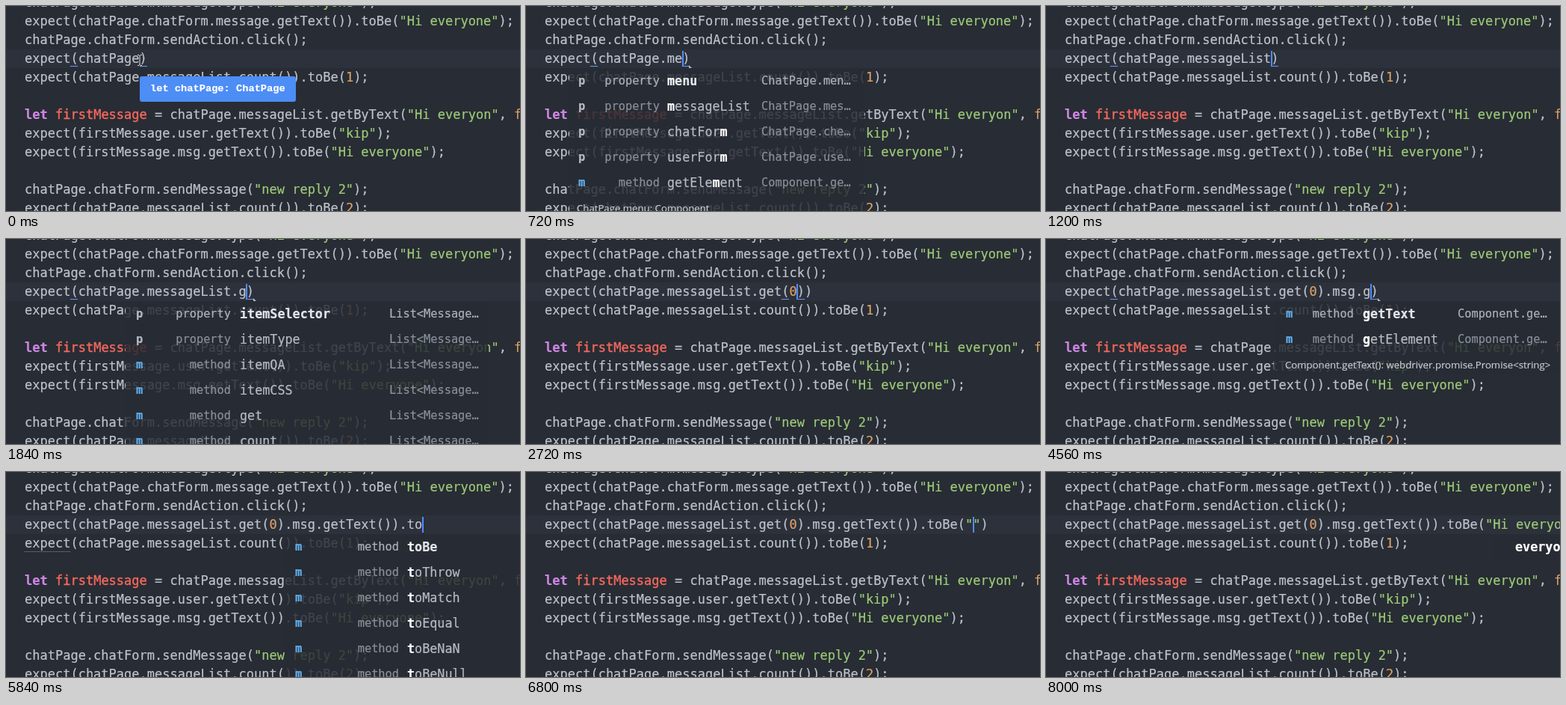
Animation of 688x274 px, one loop 8.16 s. Source, as an HTML page:

```html
<!DOCTYPE html>
<html lang="en">
<head>
<meta charset="utf-8">
<title>Editor autocompletion</title>
<style>
html, body { margin: 0; width: 100%; height: 100%; overflow: hidden; background: #282c34; }
#stage { position: relative; width: 688px; height: 274px; overflow: hidden; background: #282c34;
  color: #bdc2cc; font: 17px/25px "DejaVu Sans Mono", monospace; -webkit-text-stroke: .2px; }
#stage div, #stage i { position: absolute; white-space: pre; font-style: normal; }
.line { left: 25px; height: 25px; }
.row { left: 0; right: 0; height: 34px; line-height: 34px; font-size: 16.75px; color: #b6bbc4; }
.row.on { color: #e2e5ea; }
.row.on .name { font-weight: bold; }
.row b { color: #fff; }
.row .kind, .row .type { font-size: 15.3px; color: #8a909b; }
.row.on .kind, .row.on .type { color: #adb2bc; }
.row .icon { font-size: 15.5px; font-weight: bold; color: #b4b9c2; }
.row .icon.m { color: #61afef; }
.popup { top: 83px; overflow: hidden; background: rgba(40, 44, 52, .84); }
.note { line-height: 26px; font-family: "Open Sans", sans-serif; font-size: 13.2px; color: #c6cad2; }
.str { color: #9ccb78; }
.num { color: #dba067; }
.let { color: #cf86e6; font-weight: bold; }
.var { color: #f4685e; -webkit-text-stroke: .4px; }
.active { left: 0; top: 58px; width: 688px; height: 25px; background: #2c313b; }
.caret { top: 60px; width: 2px; height: 21px; background: #528bff; }
.pair { top: 80px; width: 10px; height: 1px; background: #6497f5; }
.lint { left: 25px; top: 106px; width: 61px; border-top: 1px dotted #8b919b; }
.tip { left: 179px; top: 94px; width: 195px; height: 34px; padding-left: 14px; border-radius: 3px;
  background: #4d8df6; color: #fff; font: bold 13.7px/33px "Liberation Mono", monospace; }
.error { left: 424px; top: 87px; width: 232px; height: 30px; border-radius: 4px;
  background: #b4b8bf; }
.error i { top: 6px; height: 18px; line-height: 18px; border-radius: 3px; text-align: center;
  color: #fff; font-size: 11.5px; font-weight: bold; }
.error .label { top: 0; height: 30px; line-height: 30px; color: #25282e; font-size: 11.9px; font-weight: normal; }
.tail { border: solid transparent; border-bottom-color: #b4b8bf; border-left: 0; border-top: 0; }
.beam { left: 176px; top: 65px; width: 6px; height: 15px; }
.beam svg { display: block; }
</style>
</head>
<body>
<div id="stage"></div>
<script>
const CHAR = 10.234, LEFT = 25, LOOP = 8160;
const stage = document.getElementById("stage");

const code = [
  'chatPage.chatForm.message.type("Hi everyone");',
  'expect(chatPage.chatForm.message.getText()).toBe("Hi everyone");',
  'chatPage.chatForm.sendAction.click();',
  '',
  'expect(chatPage.messageList.count()).toBe(1);',
  '',
  'let firstMessage = chatPage.messageList.getByText("Hi everyon", false);',
  'expect(firstMessage.user.getText()).toBe("kip");',
  'expect(firstMessage.msg.getText()).toBe("Hi everyone");',
  '',
  'chatPage.chatForm.sendMessage("new reply 2");',
  'expect(chatPage.messageList.count()).toBe(2);'
];

// Column positions are relative to the popup's left edge; rows are "icon name type".
const popups = {
  page: { x: 58, w: 395, icon: 12, kind: 121, name: 131, type: 257,
    note: "ChatPage.menu: Component", pad: 10,
    rows: ["p menu ChatPage.men…", "p messageList ChatPage.mes…", "p chatForm ChatPage.che…",
      "p userForm ChatPage.use…", "m getElement Component.ge…"] },
  list: { x: 160, w: 485, icon: 14, kind: 141, name: 153, type: 353,
    rows: ["p itemSelector", "p itemType", "m itemQA", "m itemCSS", "m get", "m count", "m getByText"]
      .map(r => r + " List<Message…") },
  item: { x: 230, w: 458, icon: 14, kind: 141, name: 153, type: 330,
    rows: ["p msg Message.msg", "p user Message.use…", "m getText Component.ge…", "m getElement Component.ge…"] },
  text: { x: 305, w: 383, icon: 16, kind: 107, name: 119, type: 246,
    note: "Component.getText(): webdriver.promise.Promise<string>", pad: 15,
    rows: ["m getText Component.ge…", "m getElement Component.ge…"] },
  expect: { x: 373, w: 400, icon: 14, kind: 153, name: 164, type: 390,
    rows: ["toBe", "toThrow", "toMatch", "toEqual", "toBeNaN", "toBeNull"].map(n => `m ${n} `) },
  word: { x: 600, w: 150, icon: 0, kind: 0, name: 28, type: 140, rows: ["- everyone "] }
};

const list = "chatPage.messageList", get = list + ".get", msg = get + "(0).msg",
  text = msg + ".getText", done = text + "())", be = done + ".toBe", hi = be + '("Hi ';

// [time, text before the caret, text after it, popup, query]
const steps = [
  [0, "chatPage", ")"],
  [480, "chatPage.", ")"],
  [560, "chatPage.", ")", "page", ""],
  [640, "chatPage.m", ")", "page", "m"],
  [720, "chatPage.me", ")", "page", "m"],
  [880, "chatPage.mes", ")", "page", "mes"],
  [1200, list, ")"],
  [1360, list + ".", ")"],
  [1600, list + ".", ")", "list", ""],
  [1760, list + ".g", ")", "list", ""],
  [1920, list + ".ge", ")", "list", "g"],
  [2000, get, ")", "list", "get"],
  [2320, get, ")"],
  [2400, get + "(", "))"],
  [2640, get + "(0", "))"],
  [2960, get + "(0)", ")"],
  [3120, get + "(0).", ")"],
  [3200, get + "(0).", ")", "item", ""],
  [3280, get + "(0).m", ")", "item", "m"],
  [3440, get + "(0).ms", ")"],
  [3520, msg, ")"],
  [4240, msg + ".", ")"],
  [4320, msg + ".", ")", "text", ""],
  [4480, msg + ".g", ")", "text", "g"],
  [4720, msg + ".ge", ")", "text", "ge"],
  [4800, msg + ".get", ")", "text", "get"],
  [4960, text, ")"],
  [5120, text + "(", "))"],
  [5200, text + "()", ")"],
  [5360, done, ""],
  [5600, done + ".", ""],
  [5680, done + ".", "", "expect", ""],
  [5760, done + ".t", "", "expect", "t"],
  [5840, done + ".to", "", "expect", "t"],
  [6080, done + ".toB", "", "expect", "toB"],
  [6240, be, ""],
  [6400, be + "(", ")"],
  [6560, be + '("', '")'],
  [6960, be + '("H', '")'],
  [7120, be + '("Hi', '")'],
  [7360, hi, '")'],
  ...[..."everyo"].map((c, i) => {
    const typed = "everyo".slice(0, i + 1);
    return [7520 + 80 * i, hi + typed, '")', i && "word", typed];
  })
];

const between = (t, a, b) => t >= a && t < b;
const at = col => LEFT + col * CHAR;
const esc = s => s.replace(/</g, "&lt;");
const div = (cls, style, html = "") => `<div class="${cls}" style="${style}">${html}</div>`;
const line = (i, s) => div("line", `top:${25 * i - 17}px`, paint(s));
const tail = (x, y, size) => div("tail", `left:${x}px;top:${y}px;border-right-width:${size}px;border-bottom-width:${size}px`);

function paint(s) {
  return s.replace(/("[^"]*"?)|\b(\d|false)\b|^let (\w+)/g, (m, str, num, name) =>
    str ? `<span class="str">${str}</span>` :
    num ? `<span class="num">${num}</span>` :
    `<span class="let">let</span> <span class="var">${name}</span>`);
}

function popup(p, query) {
  const rows = p.rows.map(r => r.split(" ")).filter(r => r[1].includes(query));
  let html = rows.map(([icon, name, type], i) => {
    const k = name.indexOf(query), end = k + query.length;
    const label = name.slice(0, k) + `<b>${query}</b>` + name.slice(end);
    const kind = { p: "property", m: "method" }[icon];
    return div("row" + (i ? "" : " on"), `top:${34 * i}px`,
      (kind ? `<i class="icon ${icon}" style="left:${p.icon}px">${icon}</i>` +
        `<i class="kind" style="right:${p.w - p.kind}px">${kind}</i>` : "") +
      `<i class="name" style="left:${p.name}px">${label}</i>` +
      `<i class="type" style="left:${p.type}px">${esc(type)}</i>`);
  }).join("");
  if (p.note) html += div("note", `left:${p.pad}px;top:${34 * rows.length + 4}px`, esc(p.note));
  const height = 34 * rows.length + (p.note ? 30 : 0);
  return div("popup", `left:${p.x}px;width:${p.w}px;height:${height}px`, html);
}

// Underlines the brackets that enclose the caret, except inside a string.
function pairs(before, after) {
  if (before.includes('"')) return "";
  let depth = 0, open = before.length - 1;
  for (; open >= 0; open--) {
    if (before[open] === ")") depth++;
    if (before[open] === "(" && depth-- === 0) break;
  }
  if (open < 0 || !after) return "";
  return [open, before.length].map(c => div("pair", `left:${at(c)}px`)).join("");
}

function scene(t) {
  const [, typed, after, name, query] = steps.findLast(s => s[0] <= t);
  const before = "expect(" + typed;
  const caretOff = t < 160 || between(t, 320, 480) || between(t, 3920, 4080) || between(t, 5440, 5600);
  let html = div("active", "") + code.map((s, i) => line(i, s)).join("") +
    line(3, before + after) + pairs(before, after);
  if (!caretOff) html += div("caret", `left:${at(before.length) - 0.5}px`);
  if (between(t, 5600, 6400)) html += div("lint", "");
  if (name) html += popup(popups[name], query);
  if (name && after === ")") html += tail(at(before.length + 1) - 1, 79, 4);
  if (t < 160) {
    html += div("tip", `opacity:${t < 80 ? 1 : 0.5}`, "let chatPage: ChatPage") +
      div("beam", "", '<svg width="6" height="15"><path d="M0 .5h2l1 1 1-1h2M3 1v13M0 14.5h2l1-1 1 1h2" fill="none" stroke="#d8dade"/></svg>');
  }
  if (between(t, 3520, 3760)) {
    html += tail(424, 80, 7) + div("error", `opacity:${t < 3680 ? 1 : 0.5}`,
      '<i style="left:6px;width:23px;background:#25282e">TS</i>' +
      '<i style="left:35px;width:40px;background:#e0352b">Error</i>' +
      '<i class="label" style="left:82px">Identifier expected.</i>');
  }
  return html;
}

let shown;
function frame(now) {
  const t = Math.floor(now % LOOP / 80) * 80;
  if (t !== shown) stage.innerHTML = scene(shown = t);
  requestAnimationFrame(frame);
}
frame(0);
</script>
</body>
</html>
```
